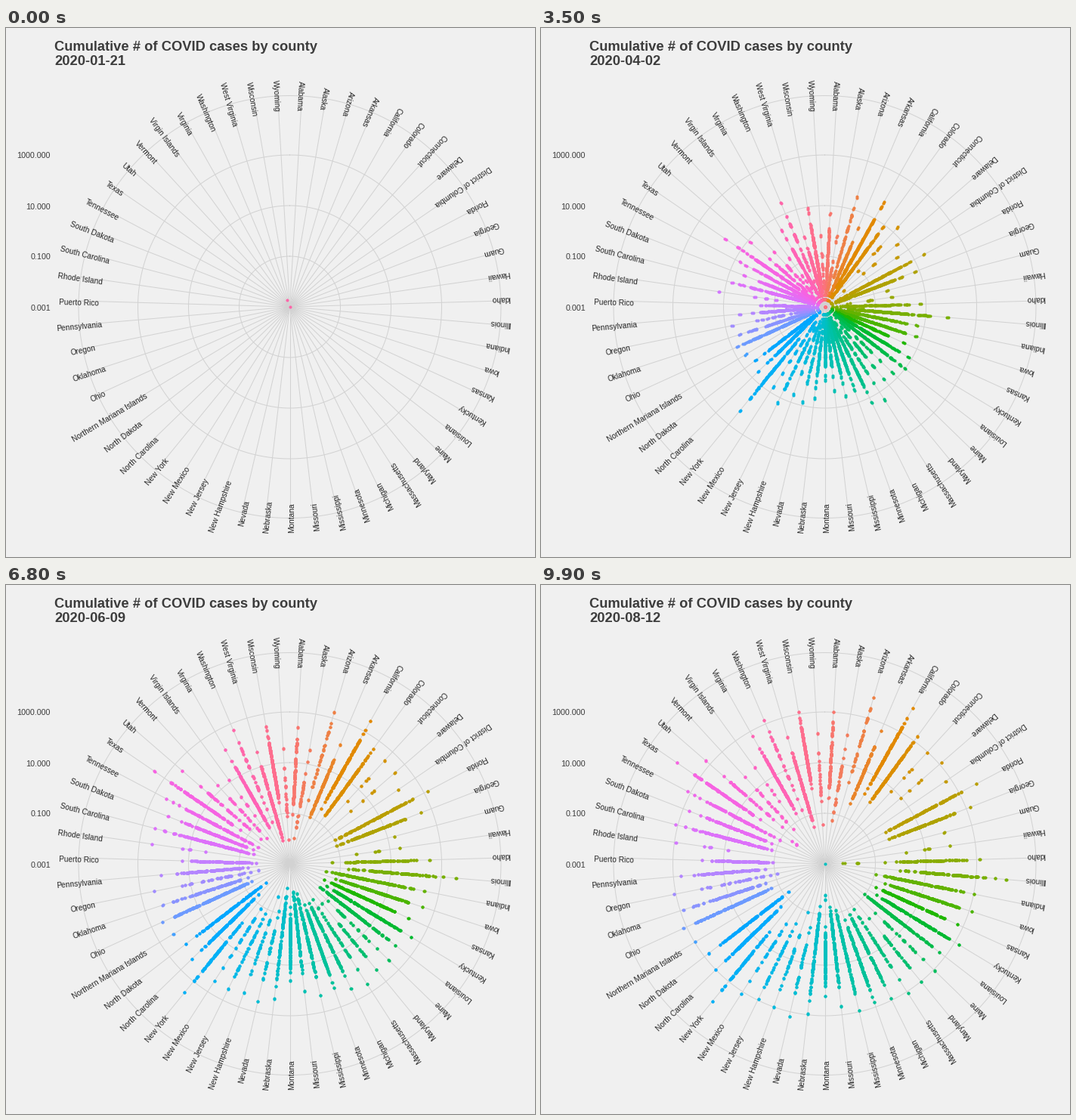
A matplotlib script for the animation above (10 s loop, 700 by 700 pixels).

```python
import numpy as np
import matplotlib.pyplot as plt
from matplotlib.animation import FuncAnimation

SIZE, DPI, FRAMES, DAYS = 700, 100, 100, 205
CX, CY, RIM = 375.5, 369.0, 279.5
DECADE = 33.5  # pixels per power of ten
BACK, GRID, INK = "#F0F0F0", "#D2D2D2", "#3C3C3C"

STATES = """Alabama,Alaska,Arizona,Arkansas,California,Colorado,Connecticut,Delaware,
District of Columbia,Florida,Georgia,Guam,Hawaii,Idaho,Illinois,Indiana,Iowa,Kansas,Kentucky,
Louisiana,Maine,Maryland,Massachusetts,Michigan,Minnesota,Mississippi,Missouri,Montana,Nebraska,
Nevada,New Hampshire,New Jersey,New Mexico,New York,North Carolina,North Dakota,
Northern Mariana Islands,Ohio,Oklahoma,Oregon,Pennsylvania,Puerto Rico,Rhode Island,
South Carolina,South Dakota,Tennessee,Texas,Utah,Vermont,Virgin Islands,Virginia,Washington,
West Virginia,Wisconsin,Wyoming""".replace("\n", "").split(",")

# What sets a state apart from the typical one
LONE = {"District of Columbia", "Guam", "Northern Mariana Islands"}
FEW = {"Connecticut", "Delaware", "Hawaii", "Rhode Island", "Virgin Islands"}
SOME = {"Alaska", "Arizona", "Maine", "Maryland", "Massachusetts", "Nevada", "New Hampshire",
        "New Jersey", "New Mexico", "Oregon", "Utah", "Vermont", "Washington", "Wyoming"}
HOT = {"Arizona", "California", "Florida", "Illinois", "New York", "Texas"}
MILD = {"Alaska", "Guam", "Hawaii", "Montana", "Puerto Rico", "Vermont", "Virgin Islands",
        "West Virginia", "Wyoming"}
SPRING = {"Connecticut", "Louisiana", "Massachusetts", "Michigan", "New Jersey", "New York",
          "Rhode Island", "Vermont", "Washington"}
LATE = {"Idaho", "Montana", "Texas"}

# Number of counties with a case before March
FIRST = dict(Washington=4, California=10, Arizona=1, Illinois=1, Massachusetts=1,
             Wisconsin=1, Texas=1, Nebraska=1, Utah=1)

DAY = np.arange(DAYS)
# Cases grow as a power of the time since mid March, with a soft start
since = 3 * np.log1p(np.exp((DAY - 55) / 3))
LAG = np.log(since[-1] / since) / np.log(since[-1] / since[94])
rng = np.random.default_rng(21)


def hue_color(i, n, lum=65, chroma=100):
    """Evenly spaced hue in polar LUV, as sRGB."""
    h = np.radians(15 + 360 * i / n)
    u = chroma * np.cos(h) / (13 * lum) + 0.1978
    v = chroma * np.sin(h) / (13 * lum) + 0.4683
    y = ((lum + 16) / 116) ** 3
    x = 9 * y * u / (4 * v)
    z = -x / 3 - 5 * y + 3 * y / v
    rgb = np.array([[3.2405, -1.5371, -0.4985],
                    [-0.9693, 1.8760, 0.0416],
                    [0.0556, -0.2040, 1.0572]]) @ [x, y, z]
    rgb = np.clip(rgb, 0, 1)
    return np.where(rgb > 0.00304, 1.055 * rgb ** (1 / 2.4) - 0.055, 12.92 * rgb)


def county_count(name):
    if name in LONE:
        return 1
    if name in FEW:
        return 5
    return rng.integers(14, 34) if name in SOME else rng.integers(55, 115)


def steady(start):
    """Running total of a single case that stays on the books."""
    return np.clip(DAY - start + 1, 0, None)


def county_radii(name):
    """Radius of every county on every day, nan before its first case."""
    n = county_count(name)
    far = 232 if name in HOT else 165 if name in MILD else 199
    far += rng.uniform(-10, 10)
    near = far * (0.65 if name in FEW else rng.uniform(0.28, 0.5))
    rise = 36 if name in SPRING else 49

    q = np.sort(rng.beta(2, 2.6, n))[::-1]
    q[-1], q[0] = 0, 1
    noise = rng.normal(0, 0.08, n) * (q < 1)
    gap = rise * (1 + 0.1 * (1 - q) + noise)
    r = (near + (far - near) * q)[:, None] - gap[:, None] * LAG
    total = np.round(10 ** (r / DECADE))

    starts = np.linspace(0 if name == "Washington" else 5, 38, FIRST.get(name, 0))
    for k, start in enumerate(starts.astype(int)):
        total[k] = np.maximum(total[k], steady(start))
    if name in LATE:
        total = np.vstack([total, *map(steady, rng.integers(165, DAYS, 3))])
    return np.where(total >= 1, DECADE * np.log10(np.maximum(total, 1)), np.nan)


def polar(r, theta):
    return CX + r * np.sin(theta), CY - r * np.cos(theta)


def px(size):
    return size * 72 / DPI


plt.rcParams["font.family"] = "Liberation Sans"
fig = plt.figure(figsize=(SIZE / DPI, SIZE / DPI), dpi=DPI, facecolor=BACK)
ax = fig.add_axes([0, 0, 1, 1])
ax.set(xlim=(0, SIZE), ylim=(SIZE, 0))
ax.axis("off")

N = len(STATES)
angles = 2 * np.pi * (np.arange(N) + 0.5) / N
line = dict(color=GRID, lw=px(1), zorder=1)
ax.plot(*polar(np.array([[0], [RIM]]), angles), **line)
turn = np.linspace(0, 2 * np.pi, 361)
for r in (2 * DECADE, 4 * DECADE, 6 * DECADE, RIM):
    ax.plot(*polar(r, turn), **line)

for k, tick in enumerate(("0.001", "0.100", "10.000", "1000.000")):
    ax.text(59, 373.5 - 2 * DECADE * k, tick, ha="right", va="baseline",
            size=px(10.7), color=INK)

for name, a in zip(STATES, angles):
    x, y = polar(RIM, a)
    drop = 5.6  # from the anchor point down to the baseline
    ax.text(x - drop * np.cos(a), y - drop * np.sin(a), name, size=px(10.1),
            color="#262626", ha="center", va="baseline", rotation=270 - np.degrees(a),
            rotation_mode="anchor", zorder=4)

head = dict(size=px(18.4), weight="bold", color=INK, va="baseline")
ax.text(64, 30, "Cumulative # of COVID cases by county", **head)
date = ax.text(64, 49, "", **head)

radii = [county_radii(name) for name in STATES]
dots = [ax.plot([], [], "o", ms=px(4.1), mew=0, color=hue_color(i, N), zorder=3)[0]
        for i in range(N)]
slot = np.rint(DAY * (FRAMES - 1) / (DAYS - 1))


def draw(frame):
    day = (DAYS - 1) * frame // (FRAMES - 1)
    date.set_text(str(np.datetime64("2020-01-21") + day))
    shown = slot == frame
    for dot, r, a in zip(dots, radii, angles):
        dot.set_data(*polar(r[:, shown].T.ravel(), a))
    return [date, *dots]


anim = FuncAnimation(fig, draw, frames=FRAMES, init_func=lambda: draw(0),
                     interval=100, repeat=True, repeat_delay=0, blit=False)
plt.show()
```
